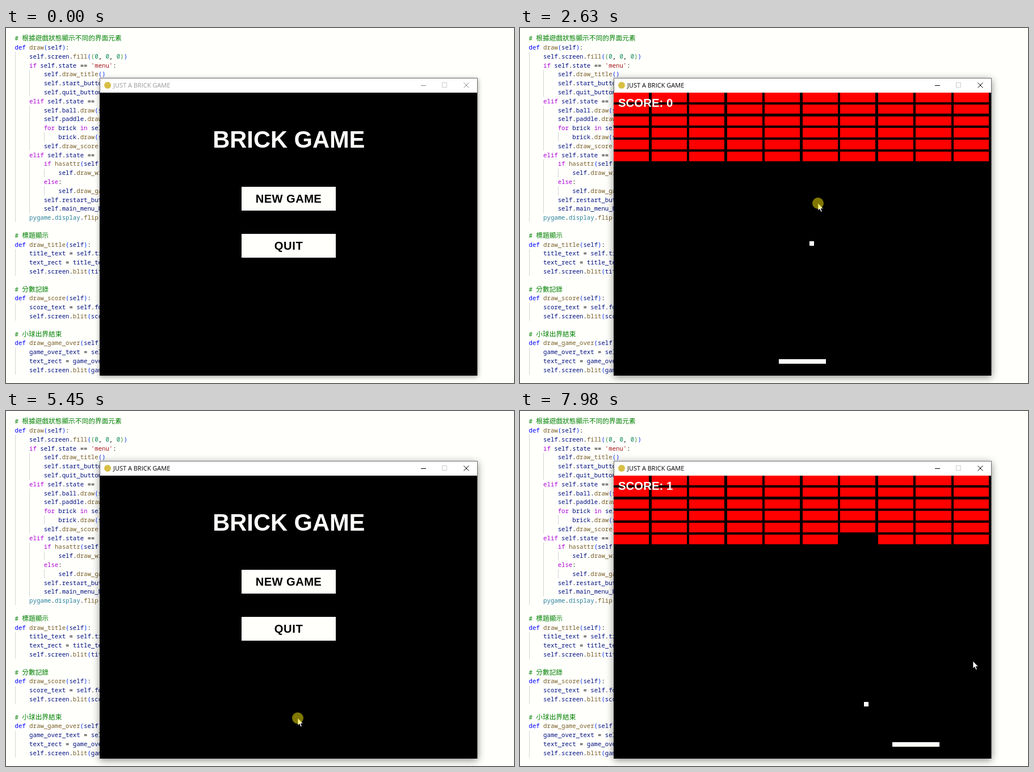
Write an HTML page that moves like this. It is 895 px wide and 626 px high and loops after 8000 ms.

```html
<!DOCTYPE html>
<html lang="zh-Hant">
<head>
<meta charset="utf-8">
<title>Brick game</title>
<style>
  html, body { margin: 0; width: 100%; height: 100%; overflow: hidden; background: #fffffc; }
  svg { display: block; width: 895px; height: 626px; }
  text { white-space: pre; }
  .code { font: 10.67px "Noto Sans Mono", "DejaVu Sans Mono", monospace; }
  .cjk { font: 11.7px "Noto Sans CJK TC", "Noto Sans CJK JP", sans-serif; }
  .game { font-family: "Liberation Sans", Arial, sans-serif; font-weight: bold; }
  .caption { font: 11px "Open Sans", "Noto Sans", sans-serif; }
  rect, .crisp { shape-rendering: crispEdges; }
</style>
</head>
<body>
<svg id="stage" viewBox="0 0 895 626"></svg>
<script>
const LOOP = 8000, TICK = 15.3, WHITE = '#fffffc', HOVER = '#c8c8c8';
const stage = document.getElementById('stage');

function add(parent, tag, attrs = {}, content = '') {
  const el = document.createElementNS('http://www.w3.org/2000/svg', tag);
  for (const key in attrs) el.setAttribute(key, attrs[key]);
  el.textContent = content;
  parent.appendChild(el);
  return el;
}
const box = (parent, x, y, width, height, fill) => add(parent, 'rect', { x, y, width, height, fill });
const show = (el, on) => el.setAttribute('display', on ? 'inline' : 'none');

// Editor behind the window
const source = `# 根據遊戲狀態顯示不同的界面元素
def draw(self):
    self.screen.fill((0, 0, 0))
    if self.state == 'menu':
        self.draw_title()
        self.start_button.draw()
        self.quit_button.draw()
    elif self.state == 'playing':
        self.ball.draw(self.screen)
        self.paddle.draw(self.screen)
        for brick in self.bricks:
            brick.draw(self.screen)
        self.draw_score()
    elif self.state == 'game_over':
        if hasattr(self, 'win'):
            self.draw_win()
        else:
            self.draw_game_over()
        self.restart_button.draw()
        self.main_menu_button.draw()
    pygame.display.flip()

# 標題顯示
def draw_title(self):
    title_text = self.title_font
    text_rect = title_text.get_rect()
    self.screen.blit(title_text)

# 分數記錄
def draw_score(self):
    score_text = self.font.render()
    self.screen.blit(score_text)

# 小球出界結束
def draw_game_over(self):
    game_over_text = self.font
    text_rect = game_over_text
    self.screen.blit(game_over_text)`;

function tokenColor(token, next) {
  if (token[0] === '#') return '#008000';
  if (token[0] === "'") return '#a31515';
  if (token === 'def') return '#0000ff';
  if (/^(if|elif|else|for|in)$/.test(token)) return '#af00db';
  if (/^\d/.test(token)) return '#098658';
  if (/^(pygame|display)$/.test(token)) return '#267f99';
  if (/^\w/.test(token)) return next === '(' ? '#795e26' : '#001080';
  return '#000';
}

function drawCode() {
  const left = 15.5, pitch = 15.8, advance = 6.4;
  source.split('\n').forEach((line, i) => {
    const indent = line.search(/\S|$/), middle = 18.5 + i * pitch;
    for (let col = 0; col < indent; col += 4)
      box(stage, Math.round(left + col * advance), middle - pitch / 2, 1, pitch, '#d3d3d3');
    const text = add(stage, 'text', { x: left + indent * advance, y: middle + 3.7, class: 'code' });
    if (line[0] === '#') {
      add(text, 'tspan', { fill: '#008000' }, '# ');
      add(text, 'tspan', { fill: '#008000', class: 'cjk' }, line.slice(2));
      return;
    }
    let depth = 0;
    const tokens = line.trim().match(/'[^']*'|\w+|[()]|[^\w()']+/g) || [];
    tokens.forEach((token, k) => {
      let fill = tokenColor(token, tokens[k + 1]);
      if (token === '(') depth++;
      if (/[()]/.test(token)) fill = depth > 1 ? '#319331' : '#0431fa';
      if (token === ')') depth--;
      add(text, 'tspan', { fill }, token);
    });
  });
}
drawCode();

// Window frame
const frame = box(stage, 165, 88, 666, 525, '#6e6e6e');
box(stage, 166, 89, 664, 25, '#fff');
box(stage, 165, 114, 665, 498.5, '#000');
add(stage, 'circle', { cx: 179, cy: 101, r: 6, fill: '#d8bf45' });
const caption = add(stage, 'text', { x: 189, y: 105, class: 'caption' }, 'JUST A BRICK GAME');
const controls = add(stage, 'g', { fill: 'none' });
add(controls, 'path', { d: 'M731 101.5h9', class: 'crisp' });
add(controls, 'path', { d: 'M806.5 96.5l9 9m0-9l-9 9' });
add(stage, 'rect', { x: 768.5, y: 96.5, width: 8, height: 8, fill: 'none', stroke: '#ccc' });

// Scenes
const label = (parent, text, x, y, size, fill, extra = {}) =>
  add(parent, 'text', { x, y, fill, 'font-size': size, 'text-anchor': 'middle', class: 'game', ...extra }, text);

function button(parent, text, top, spacing) {
  const face = box(parent, 415, top, 166, 41.5, WHITE);
  label(parent, text, 498, top + 27.5, 20.2, '#000', { 'letter-spacing': spacing });
  return { face, top };
}

const menu = add(stage, 'g'), play = add(stage, 'g'), over = add(stage, 'g');
label(menu, 'BRICK GAME', 498.3, 211, 41.6, WHITE);
label(over, 'GAME OVER! SCORE:  0', 498.5, 331, 27.8, '#0f0');
const buttons = [
  button(menu, 'NEW GAME', 280, 0.4), button(menu, 'QUIT', 363.3, 0.6),
  button(over, 'RESTART', 363.3, 0), button(over, 'BACK TO MENU', 529.7, 0)
];

const field = add(play, 'g', { transform: 'translate(165 114) scale(.8315)' });
const bricks = Array.from({ length: 60 }, (_, i) => {
  const x = i % 10 * 80, y = Math.floor(i / 10) * 25;
  return { x, y, el: box(field, x, y, 75, 20, '#f00') };
});
const paddle = box(field, 350, 565, 100, 10, WHITE);
const ball = box(field, 395, 295, 10, 10, WHITE);
const score = label(play, '', 173, 139, 20.4, WHITE, { 'text-anchor': 'start' });

const cursor = add(stage, 'g');
add(cursor, 'path', {
  d: 'M0 0V13L3 10.3L5.2 15.3L7.3 14.4L5.2 9.6H9.3Z', fill: '#fff', stroke: '#000', 'stroke-width': 0.7
});
const halo = add(cursor, 'circle', { r: 10, fill: '#fe0', opacity: 0.5 });

const bursts = [
  [60, 530, 9], [1020, 1140, 2], [1950, 2190, 5], [2440, 2570, 2], [2630, 3230, 11],
  [3310, 3490, 4], [4120, 4490, 6], [4760, 5240, 9], [5450, 5740, 6],
  [5990, 6740, 13], [6800, 7600, 14], [7670, 7980, 6]
];
const route = [
  [60, 829, 603], [295, 690, 470], [410, 641, 411], [530, 708.5, 421.5],
  [1890, 708.5, 421.5], [2000, 690, 430], [2190, 527, 312], [2440, 525, 309],
  [2690, 525, 309], [3170, 702, 410.5], [4060, 702, 410.5], [4290, 500, 500],
  [4490, 353, 526], [4700, 353, 526], [4900, 440, 392], [5000, 470, 398],
  [5240, 514, 541.5], [5450, 514, 541.5], [5740, 536, 300], [6110, 536, 300],
  [6600, 798, 441], [LOOP, 798, 441]
];
const clicks = [1020, 2570, 5450, 5990];

function lastRefresh(t) {
  let shown = 0;
  for (const [from, to, count] of bursts) {
    if (t < from) break;
    const step = (to - from) / (count - 1);
    shown = Math.min(to, from + Math.floor((t - from) / step + 1e-6) * step);
  }
  return shown;
}

function pointer(t) {
  const i = Math.max(1, route.findIndex(key => key[0] >= t));
  const [t0, x0, y0] = route[i - 1], [t1, x1, y1] = route[i];
  const k = Math.max(0, (t - t0) / (t1 - t0));
  return [x0 + (x1 - x0) * k, y0 + (y1 - y0) * k];
}

function simulate(ticks, dy, steering) {
  let x = 395, y = 295, dx = 5, pad = 350;
  const broken = new Set();
  for (let n = 1; n <= ticks; n++) {
    x += dx;
    y += dy;
    if (steering && n > 62) pad = Math.min(590, pad + 8);
    if (x <= 0 || x >= 790) dx = -dx;
    if (y <= 0) dy = -dy;
    if (dy > 0 && y + 10 > 565 && y < 575 && x + 10 > pad && x < pad + 100) dy = -dy;
    const hit = bricks.find(b => !broken.has(b) &&
      x < b.x + 75 && x + 10 > b.x && y < b.y + 20 && y + 10 > b.y);
    if (hit) {
      broken.add(hit);
      dy = -dy;
    }
  }
  return { x, y, pad, broken };
}

function drawGame(t) {
  const second = t > 5000;
  const ticks = Math.floor((t - (second ? 5974 : 2568)) / TICK);
  const game = simulate(ticks, second ? -5 : 5, second);
  ball.setAttribute('x', game.x);
  ball.setAttribute('y', game.y);
  paddle.setAttribute('x', game.pad);
  bricks.forEach(b => show(b.el, !game.broken.has(b)));
  score.textContent = 'SCORE: ' + game.broken.size;
}

function render(time) {
  const t = lastRefresh(time);
  const playing = t >= 2570 && t < 3480 || t >= 5990;
  const ended = t >= 3480 && t < 5450;
  show(play, playing);
  show(over, ended);
  show(menu, !playing && !ended);
  if (playing) drawGame(t);

  const active = t >= 1020;
  frame.style.filter = active
    ? 'drop-shadow(0 3px 7px rgba(0,0,0,.45))' : 'drop-shadow(0 2px 4px rgba(0,0,0,.4))';
  caption.setAttribute('fill', active ? '#000' : '#999');
  controls.setAttribute('stroke', active ? '#000' : '#888');

  const [x, y] = pointer(t);
  show(cursor, t >= 60);
  cursor.setAttribute('transform', `translate(${x} ${y})`);
  show(halo, clicks.some(c => t >= c && t < c + 120));
  for (const { face, top } of buttons) {
    const over = t >= 60 && x >= 415 && x < 581 && y >= top && y < top + 41.5;
    face.setAttribute('fill', over ? HOVER : WHITE);
  }
}

const start = performance.now();
function loop() {
  render((performance.now() - start) % LOOP);
  requestAnimationFrame(loop);
}
loop();
</script>
</body>
</html>
```
